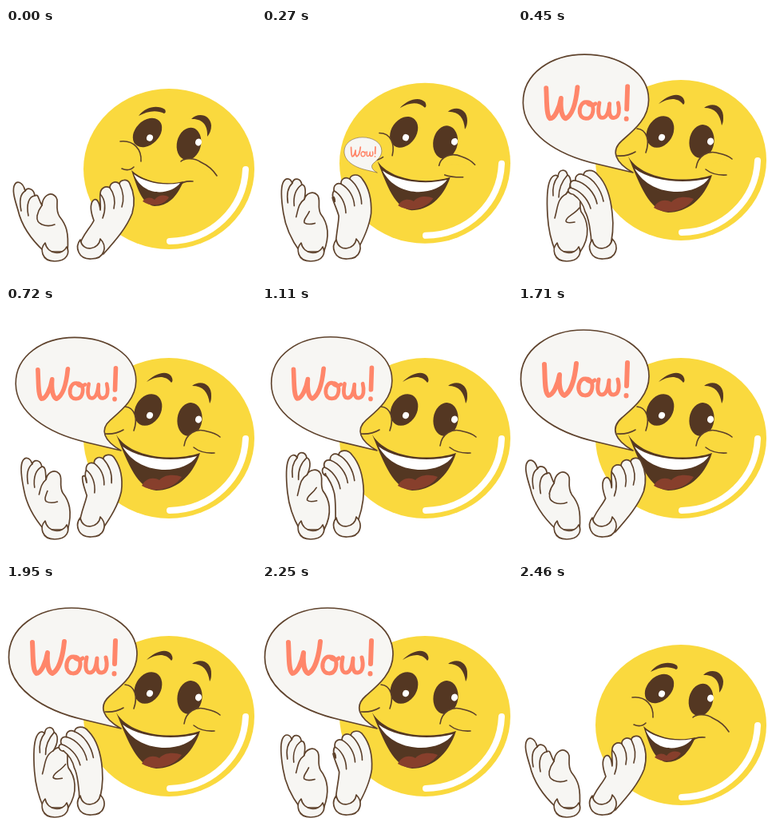
An HTML page that plays this animation: 313x313 px, repeating every 2.49 s.

```html
<!DOCTYPE html>
<html lang="en">
<head>
<meta charset="utf-8">
<title>Clapping smiley</title>
<style>
  html, body { margin: 0; width: 100%; height: 100%; overflow: hidden; background: #fff; }
  svg { display: block; width: 100vw; height: 100vh; }
  path { stroke-linecap: round; stroke-linejoin: round; }
  .line { fill: none; stroke: #5b3f2a; stroke-width: 1.6; }
  .cheek { fill: #fad93e; stroke: #5b3f2a; stroke-width: 1.6; }
  .dark { fill: #543722; }
  .white { fill: #fff; }
  .tongue { fill: #873f2c; }
  .paper { fill: #f7f6f3; stroke: #5f432d; stroke-width: 1.7; }
  .shine { fill: none; stroke: #fff; stroke-width: 8; }
  .letters { fill: none; stroke: #ff866a; stroke-width: 6; }
</style>
</head>
<body>
<svg viewBox="0 0 313 313">
  <g id="head">
    <ellipse cx="204" cy="176.5" rx="107" ry="100.5" fill="#fad93e"/>
    <path class="shine" d="M300 177C298 226 258 266 205 267"/>
  </g>
  <g id="features"></g>
  <g id="bubble">
    <path class="paper" d="M144 181L98 170C45 158 4 130 3.500 92C3 54 40 30 82 30C125 30 164 52 164 88C164 112 145 127 130 140C115 153 121 168 144 181Z"/>
    <g class="letters" role="img" aria-label="Wow!">
      <path d="M33 73C34 90 33 108 38 112C44 112 50 98 52 86C51 100 53 110 58 112C66 108 71 92 73 72"/>
      <path stroke-width="5" d="M85 91C78 90 75 99 76 105C78 114 89 114 92 106C95 97 91 91 85 91C87 95 92 96 96 93"/>
      <path stroke-width="5" d="M101 92C99 102 99 111 105 111C111 111 113 102 114 93C113 104 114 112 120 111C127 110 127 100 125 92"/>
      <path d="M137 71L136 100M135.500 112L135.500 112.500"/>
    </g>
  </g>
  <g id="hands"></g>
</svg>
<script>
const LOOP = 2490, STEP = 30;
const el = id => document.getElementById(id);

// Each part: class, resting shape, active shape
const features = [
  ['dark', 'M166 110C175 98 190 96 199 102Q201 106 198 107C188 102 177 104 166 110Z',
           'M176 95C185 86 200 79 207 88Q210 94 207 96C199 86 188 88 176 95Z'],
  ['dark', 'M232 114C240 105 256 108 257 122Q257 130 252 136C253 122 246 113 232 114Z',
           'M233 100C243 92 258 97 257 113Q257 119 255 122C253 108 247 100 233 100Z'],
  ['dark', 'translate(177 131) rotate(45) scale(15 21)', 'translate(178 130) rotate(30) scale(16 21)'],
  ['dark', 'translate(229 145) rotate(14) scale(15 20.5)', 'translate(230 142) rotate(8) scale(15.5 21)'],
  ['white', 'translate(180 137.5) rotate(20) scale(4 4.2)', 'translate(180 137) rotate(20) scale(4 4.2)'],
  ['white', 'translate(241 143) rotate(20) scale(4 4.5)', 'translate(241 142) rotate(20) scale(4 4.5)'],
  ['cheek', 'M143 142C160 140 170 152 169 167', 'M149 126C162 127 165 142 160 156'],
  ['cheek', 'M219 167C222 164 234 161 244 168Q257 174 264 185', 'M223 175C225 160 238 152 252 157Q262 159 268 164'],
  ['line', 'M145 176Q154 180 160 174', 'M124 160Q137 161 147 155'],
  ['line', 'M217 197Q222 191 234 192', 'M235 177Q245 185 261 184'],
  ['dark', 'M157 178C172 192 199 198 222 192C214 212 202 223 186 223C170 221 164 199 157 178Z',
           'M138 161C156 191 210 195 243 184C233 215 211 231 188 231C165 229 153 198 138 161Z'],
  ['white', 'M160 183C175 194 197 198 218 194C208 208 173 214 160 183Z',
            'M146 176C167 192 209 196 239 188C224 211 167 214 146 176Z'],
  ['tongue', 'M171 217C175 212 181 211 186 215C191 209 198 208 204 212C198 222 182 225 171 217Z',
             'M170 225C175 215 185 214 192 218C198 211 210 210 220 214C210 229 186 235 170 225Z'],
];

const hands = [
  ['paper', 'M48 280C35 268 20 250 15 228C11 215 8 205 10 198C13 190 21 192 24 204C27 199 35 201 36 210C41 207 40 214 45 222C46 210 55 205 61 210C68 215 60 225 67 236C75 246 79 255 77 280Z',
            'M47 280C42 268 38 252 37 235C36 218 36 200 40 191C43 184 48 183 50 186C51 176 60 176 62 184C67 187 68 197 60 208C63 204 72 202 76 208C80 214 76 222 79 230C87 240 92 260 78 280Z'],
  ['line', 'M19 229C16 214 19 207 24 204M28 235C25 220 29 211 36 210M45 222C37 234 39 242 44 245C49 248 55 248 61 246',
           'M44 210C43 200 45 192 50 186M51 212C51 202 55 192 62 184M60 208C49 214 50 224 46 238M77 225C70 234 60 236 60 242C61 244 66 244 71 243'],
  ['paper', 'M122 283C138 265 151 250 158 232C162 218 160 205 155 195C152 188 143 190 142 195C136 190 130 195 130 200C124 197 118 201 118 208C117 215 119 222 118 228C117 217 113 212 109 216C104 222 107 233 110 241C106 250 93 262 92 274Z',
            'M114 279C119 262 120 248 118 232C116 212 110 194 100 184C94 176 83 177 82 184C76 181 71 185 72 191C66 190 64 195 66 200C61 201 62 207 68 208C69 208 69 208 70 209C76 213 82 221 84 230C88 236 92 257 92 274Z'],
  ['line', 'M142 195C147 205 148 215 145 224M130 200C136 208 137 217 135 226M118 208C125 215 125 228 121 238',
           'M82 184C94 188 104 202 107 217M72 191C85 194 96 206 99 220M66 200C76 203 87 212 91 226'],
];
// The inner thumb and palm creases need the same number of strokes in both poses
hands[1][1] += 'M61 246C61 246 60 246 60 246';

const cuffs = [
  'M49 269C42 276 44 292 61 292C77 292 80 281 76 274C71 285 52 284 49 269Z',
  'M93 265C86 274 90 290 107 289C124 289 127 273 118 264C117 277 96 282 93 265Z',
];

function addPath(group, cls) {
  const path = document.createElementNS('http://www.w3.org/2000/svg', 'path');
  path.setAttribute('class', cls);
  return el(group).appendChild(path);
}

// Blend the numbers of two strings that share one structure
function mix(a, b, u) {
  const goal = b.match(/[\d.]+/g);
  let i = 0;
  return a.replace(/[\d.]+/g, n => (+n + (goal[i++] - n) * u).toFixed(2));
}

function build(group, parts) {
  const setters = parts.map(([cls, rest, active]) => {
    const path = addPath(group, cls);
    const round = rest.startsWith('translate');
    if (round) path.setAttribute('d', 'M-1 0A1 1 0 0 1 1 0A1 1 0 0 1 -1 0Z');
    return u => path.setAttribute(round ? 'transform' : 'd', mix(rest, active, u));
  });
  return u => setters.forEach(set => set(u));
}

function ease(t, from, to) {
  const p = Math.min(1, Math.max(0, (t - from) / (to - from)));
  return (1 - Math.cos(Math.PI * p)) / 2;
}

// In the open pose the crease starts from the thumb; its two strokes meet there
hands[1][1] = 'M19 229C16 214 19 207 24 204M28 235C25 220 29 211 36 210M45 222C42 226 40 230 39 235M39 235C38 243 42 244 45 246C50 248 56 248 61 246';

const poseFace = build('features', features);
const poseHands = build('hands', hands);
cuffs.forEach(d => addPath('hands', 'paper').setAttribute('d', d));

function draw(now) {
  const clock = now % LOOP;
  const t = clock < 120 ? 0 : Math.floor(clock / STEP) * STEP;

  const joy = ease(t, 90, 390) - ease(t, 2250, 2460);
  poseFace(joy);
  el('head').setAttribute('transform', `translate(0 ${-11 * joy})`);

  const size = ease(t, 150, 480) - 0.15 * (ease(t, 600, 870) - ease(t, 870, 1290)) - ease(t, 2250, 2440);
  el('bubble').setAttribute('transform', `translate(144 181) scale(${size}) translate(-144 -181)`);
  el('bubble').style.display = size > 0.01 ? '' : 'none';

  const phase = Math.max(0, (t - 105) / 790) % 1;
  poseHands(ease(phase, 0, 0.4) - ease(phase, 0.44, 1));

  requestAnimationFrame(draw);
}
draw(performance.now());
</script>
</body>
</html>
```
